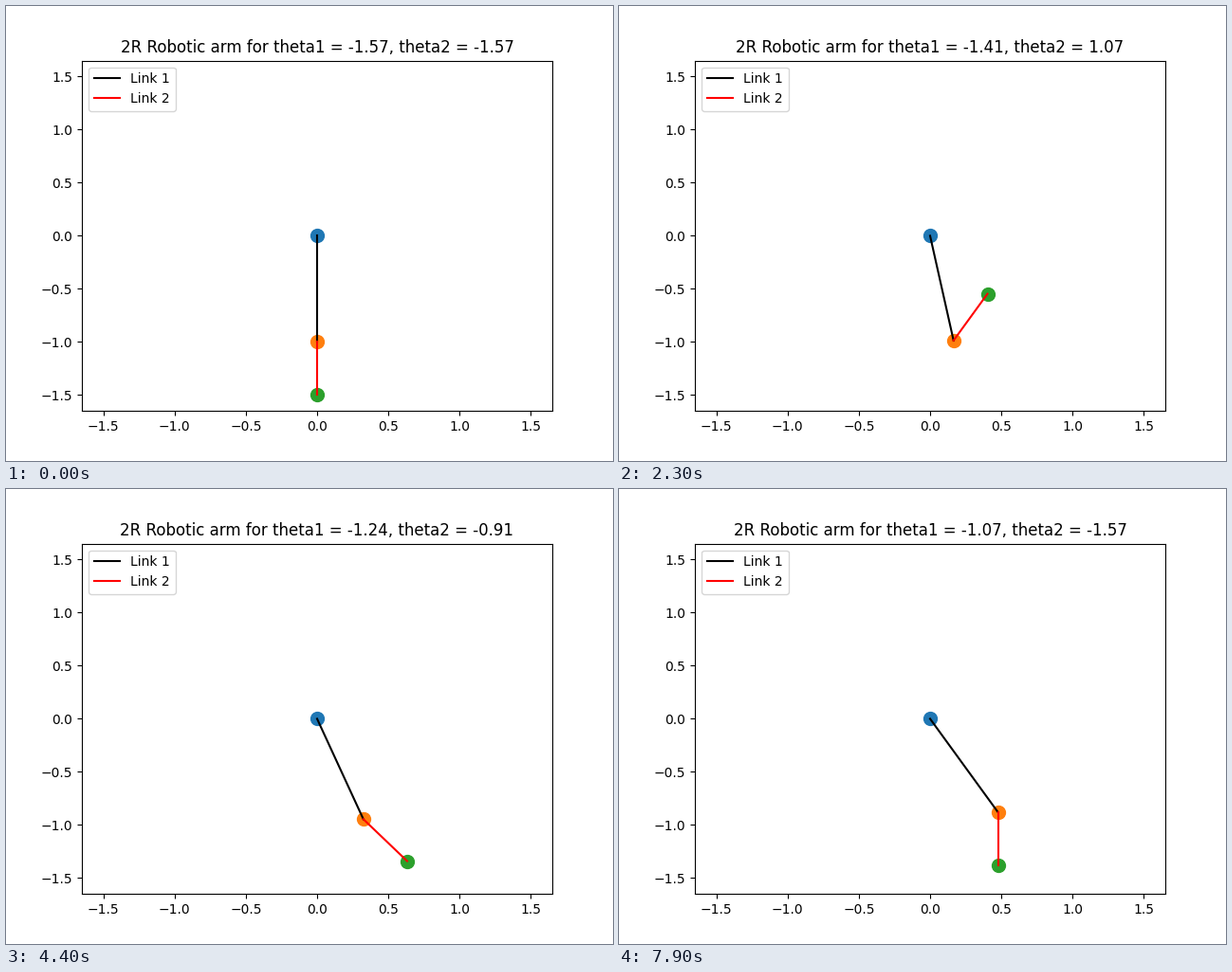
A matplotlib script for the animation above (8000 ms loop, 640x480 px).

```python
import numpy as np
import matplotlib.pyplot as plt
from matplotlib.animation import FuncAnimation

L1, L2 = 1.0, 0.5
STEPS = 20
FRAMES = 80
LIMIT = 1.65

angles = np.linspace(-np.pi / 2, np.pi / 2, STEPS)

fig, ax = plt.subplots(figsize=(6.4, 4.8), dpi=100)
ax.set_xlim(-LIMIT, LIMIT)
ax.set_ylim(-LIMIT, LIMIT)

joints = [ax.scatter([0], [0], s=100, color=c) for c in ("C0", "C1", "C2")]
link1, = ax.plot([], [], color="black", label="Link 1")
link2, = ax.plot([], [], color="red", label="Link 2")
ax.legend(loc="upper left")
title = ax.set_title("")


def pose(frame):
    """Sweep theta2 back and forth, advancing theta1 after each sweep."""
    row, col = divmod(frame, STEPS)
    if row % 2:
        col = STEPS - 1 - col
    return angles[row], angles[col]


def polar(length, angle):
    return length * np.array([np.cos(angle), np.sin(angle)])


def update(frame):
    t1, t2 = pose(frame)
    base = np.zeros(2)
    elbow = polar(L1, t1)
    tip = elbow + polar(L2, t2)
    for joint, point in zip(joints, (base, elbow, tip)):
        joint.set_offsets([point])
    link1.set_data(*zip(base, elbow))
    link2.set_data(*zip(elbow, tip))
    title.set_text(f"2R Robotic arm for theta1 = {t1:.2f}, theta2 = {t2:.2f}")
    return [*joints, link1, link2, title]


anim = FuncAnimation(fig, update, frames=FRAMES, interval=100,
                     repeat=True, repeat_delay=0, blit=False)
plt.show()
```
